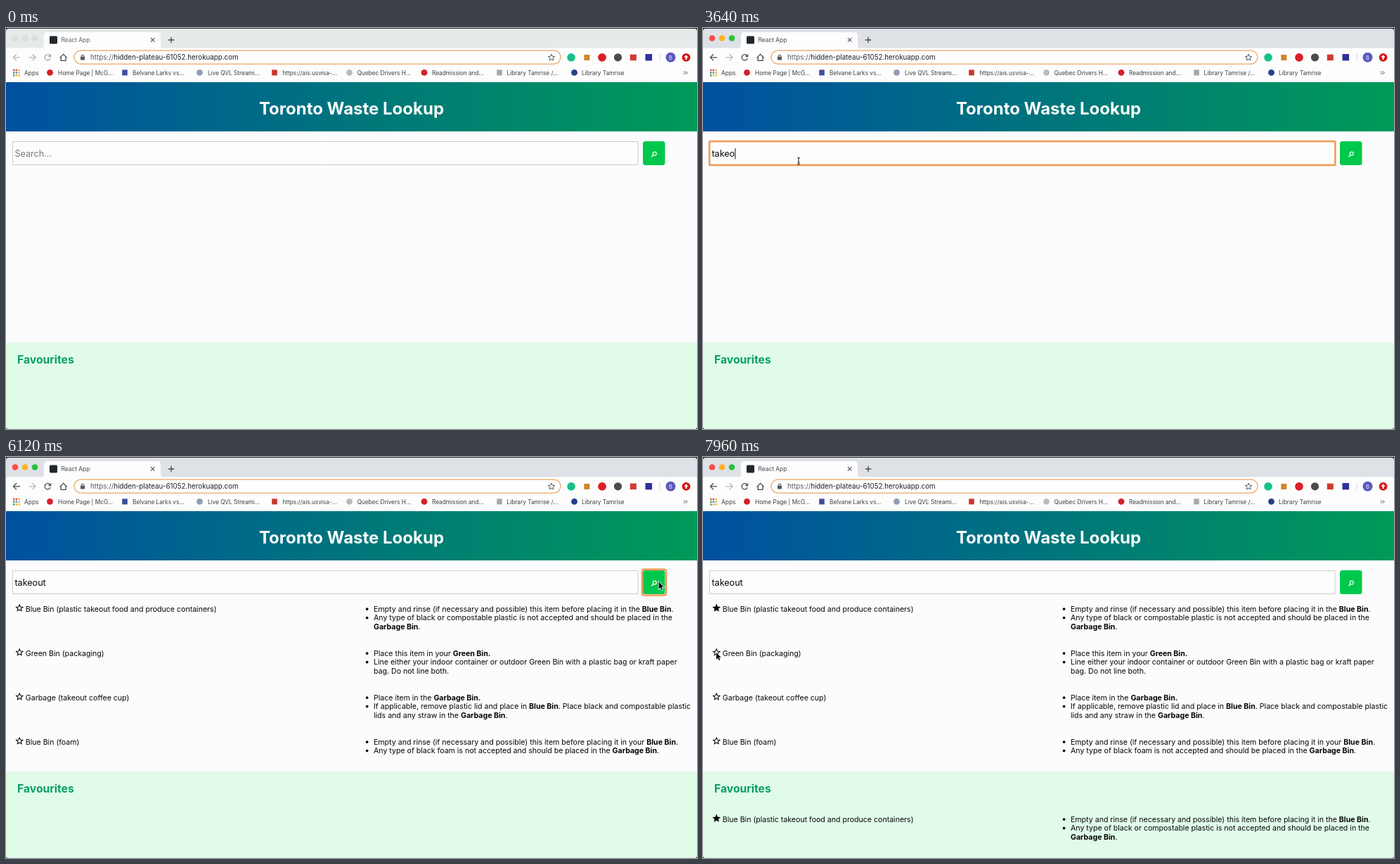
Write an HTML page with a canvas that moves like this. It is 983 by 570 pixels and loops after 8000 ms.

```html
<!DOCTYPE html>
<html lang="en">
<head>
<meta charset="utf-8">
<title>Waste Lookup</title>
<style>
  html, body { margin: 0; width: 100%; height: 100%; overflow: hidden; background: #2b2b2b; }
  canvas { display: block; width: 983px; height: 570px; }
</style>
</head>
<body>
<canvas id="stage"></canvas>
<script>
const W = 983, H = 570, LOOP = 8000;
const canvas = document.getElementById('stage');
const ctx = canvas.getContext('2d');
const dpr = window.devicePixelRatio || 1;
canvas.width = Math.round(W * dpr);
canvas.height = Math.round(H * dpr);

// Timeline in ms
const FOCUS = 1240, SUBMIT = 5600, RESULTS = 6080, FAVOURITE = 7320;
const QUERY = 'takeout';
const KEYS = [2760, 2920, 3080, 3280, 3520, 3800, 4000];
const PATH = [
  [400, 236, 569], [720, 193, 366], [1160, 136, 189], [4440, 136, 189],
  [5280, 928.6, 177.6], [6160, 928.6, 177.6], [6840, 20.8, 212.8], [7480, 20.8, 212.8], [7880, 18.8, 277.8]
];

const BOOKMARKS = [
  [62.5, 'dot', '#d3202a', 74, 'Home Page | McG...'],
  [169, 'box', '#3d4f9a', 180, 'Belvane Larks vs...'],
  [275.5, 'dot', '#8f9db5', 287, 'Live QVL Streami...'],
  [382, 'box', '#c8372d', 393.5, 'https://ais.usvisa-...'],
  [488.5, 'dot', '#b9bcb8', 499.5, 'Quebec Drivers H...'],
  [595, 'dot', '#d3202a', 606, 'Readmission and...'],
  [702, 'box', '#a5a7a8', 712.5, 'Library Tamrise /...'],
  [808.5, 'dot', '#27408b', 819, 'Library Tamrise']
];

// Asterisks switch bold on and off; each inner list is one bullet
const ITEMS = [
  ['Blue Bin (plastic takeout food and produce containers)', [
    ['Empty and rinse (if necessary and possible) this item before placing it in the *Blue Bin*.'],
    ['Any type of black or compostable plastic is not accepted and should be placed in the', '*Garbage Bin*.']]],
  ['Green Bin (packaging)', [
    ['Place this item in your *Green Bin.*'],
    ['Line either your indoor container or outdoor Green Bin with a plastic bag or kraft paper', 'bag. Do not line both.']]],
  ['Garbage (takeout coffee cup)', [
    ['Place item in the *Garbage Bin.*'],
    ['If applicable, remove plastic lid and place in *Blue Bin*. Place black and compostable plastic', 'lids and any straw in the *Garbage Bin*.']]],
  ['Blue Bin (foam)', [
    ['Empty and rinse (if necessary and possible) this item before placing it in your *Blue Bin*.'],
    ['Any type of black foam is not accepted and should be placed in the *Garbage Bin*.']]]
];
const BODY_SIZE = 10.59;

function text(str, x, y, size, color, weight = 400, align = 'left') {
  ctx.font = `${weight} ${size}px Inter, "Noto Sans", sans-serif`;
  ctx.fillStyle = color;
  ctx.textAlign = align;
  ctx.fillText(str, x, y);
  return ctx.measureText(str).width;
}

function richText(str, x, y) {
  str.split('*').forEach((part, i) => {
    x += text(part, x, y, BODY_SIZE, '#060606', i % 2 ? 700 : 400);
  });
}

function rect(x, y, w, h, color) {
  ctx.fillStyle = color;
  ctx.fillRect(x, y, w, h);
}

function round(x, y, w, h, r) {
  ctx.beginPath();
  ctx.roundRect(x, y, w, h, r);
}

function fill(color) { ctx.fillStyle = color; ctx.fill(); }

function stroke(color, width) {
  ctx.strokeStyle = color;
  ctx.lineWidth = width;
  ctx.stroke();
}

function dot(x, y, r, color) {
  ctx.beginPath();
  ctx.arc(x, y, r, 0, Math.PI * 2);
  fill(color);
}

function poly(points, close) {
  ctx.beginPath();
  for (let i = 0; i < points.length; i += 2) ctx.lineTo(points[i], points[i + 1]);
  if (close) ctx.closePath();
}

function line(color, width, ...points) {
  poly(points);
  stroke(color, width);
}

function star(x, y, r, color, width, solid) {
  const pts = [];
  for (let i = 0; i < 10; i++) {
    const a = i * Math.PI / 5 - Math.PI / 2, d = i % 2 ? r * 0.46 : r;
    pts.push(x + d * Math.cos(a), y + d * Math.sin(a));
  }
  poly(pts, true);
  if (solid) fill(color);
  stroke(color, width);
}

function drawTabs(active) {
  rect(0, 0, W, 29, active ? '#dee1e6' : '#e7eaea');
  ['#fc4b47', '#fdb324', '#27c23a'].forEach((color, i) => {
    dot(13 + 14 * i, 14.5, 4.3, active ? color : '#d3d6d6');
    if (!active) dot(13 + 14 * i, 14.5, 3.6, '#dcdfdf');
  });
  ctx.beginPath();
  ctx.moveTo(49, 29);
  ctx.quadraticCurveTo(54, 29, 54, 24);
  ctx.lineTo(54, 11);
  ctx.quadraticCurveTo(54, 6, 59, 6);
  ctx.lineTo(215, 6);
  ctx.quadraticCurveTo(220, 6, 220, 11);
  ctx.lineTo(220, 24);
  ctx.quadraticCurveTo(220, 29, 225, 29);
  fill('#fdfdfe');
  round(62, 11.5, 11, 11, 1.5);
  fill('#20282e');
  text('React App', 78.5, 20, 8.4, active ? '#44474b' : '#5c5f62');
  line('#55585c', 1.2, 206, 14.2, 211.4, 19.6);
  line('#55585c', 1.2, 211.4, 14.2, 206, 19.6);
  line('#45484c', 1.3, 230.8, 17, 239.2, 17);
  line('#45484c', 1.3, 235, 12.8, 235, 21.2);
}

function drawNav(active) {
  const dark = active ? '#4a4d51' : '#a3a5a7', pale = '#b4b6b8';
  line(active ? dark : pale, 1.3, 20, 41.8, 10.6, 41.8);
  line(active ? dark : pale, 1.3, 15, 37.2, 10.4, 41.8, 15, 46.4);
  line(pale, 1.3, 32.6, 41.8, 42, 41.8);
  line(pale, 1.3, 37.6, 37.2, 42.2, 41.8, 37.6, 46.4);
  ctx.beginPath();
  ctx.arc(59.3, 41.8, 4.1, 0.35, Math.PI * 1.75);
  stroke(dark, 1.4);
  poly([64.2, 36.8, 64.2, 41.2, 59.8, 41.2], true);
  fill(dark);
  line('#45484c', 1.3, 76.6, 42.4, 81.6, 37.4, 86.6, 42.4);
  line('#45484c', 1.3, 78.2, 41.2, 78.2, 46.4, 85, 46.4, 85, 41.2);

  round(97, 32, 692, 19.2, 9.6);
  fill('#fefefe');
  stroke('#efb27e', 1.5);
  round(106, 40.6, 6, 5, 0.7);
  fill('#55585c');
  ctx.beginPath();
  ctx.arc(109, 40.2, 1.9, Math.PI, 0);
  stroke('#55585c', 1.1);
  const schemeWidth = text('https://', 120, 45.2, 9.79, '#56595d');
  text('hidden-plateau-61052.herokuapp.com', 120 + schemeWidth, 45.2, 9.79, '#1d1f22');
  star(776, 42, 4.9, '#55585c', 1);
}

function drawExtensions() {
  dot(804, 41.8, 5.8, '#14c287');
  rect(822.3, 38, 8, 8, '#d9822b');
  dot(848, 41.8, 5.9, '#dc1f26');
  dot(870.5, 41.8, 5.6, '#4b4b4b');
  rect(887.8, 37.6, 9, 8.6, '#d03a32');
  rect(909.5, 37, 9.6, 9.4, '#2f319c');
  rect(929.5, 36, 1, 11, '#d6d8da');
  dot(945.5, 41.8, 7, '#5b59bd');
  text('B', 945.5, 44.5, 7.4, '#e9e9fa', 400, 'center');
  dot(967.6, 41.8, 5.9, '#d8140f');
  poly([967.6, 38.2, 970.8, 41.8, 968.7, 41.8, 968.7, 45, 966.5, 45, 966.5, 41.8, 964.4, 41.8], true);
  fill('#fff');
}

function drawBookmarks() {
  const colors = ['#d9493c', '#d9493c', '#e9b52c', '#3a9c56', '#4383e0', '#e9b52c', '#3a9c56', '#e9b52c', '#e9b52c'];
  colors.forEach((c, i) => rect(10 + i % 3 * 3.7, 58.8 + Math.floor(i / 3) * 3.7, 2.4, 2.4, c));
  text('Apps', 26, 66.6, 8.4, '#3b3e42');
  for (const [x, shape, color, tx, label] of BOOKMARKS) {
    if (shape === 'dot') dot(x, 63.4, 4.4, color);
    else rect(x - 3.8, 59.4, 7.6, 8, color);
    text(label, tx, 66.6, 8.27, '#3b3e42');
  }
  for (const x of [964, 967]) line('#45484c', 1, x, 61.4, x + 2.2, 63.6, x, 65.8);
}

function drawHeader() {
  const g = ctx.createLinearGradient(0, 0, W, 0);
  g.addColorStop(0, '#0050a0');
  g.addColorStop(1, '#009a58');
  rect(0, 77, W, 70, g);
  text('Toronto Waste Lookup', 491.5, 122.8, 24, '#fbfdfd', 700, 'center');
}

function focusRing(x, y, w, h, r) {
  round(x, y, w, h, r);
  stroke('rgba(244,170,110,.45)', 3.6);
  stroke('#ee9450', 1.9);
}

function drawSearch(t) {
  const typed = QUERY.slice(0, KEYS.filter(k => k <= t).length);
  const focused = t >= FOCUS && t < SUBMIT;
  round(9.5, 161.5, 889.5, 33, 0);
  fill('#fdfdfe');
  stroke('#cbcdc2', 1);
  if (focused) focusRing(9.2, 161.1, 890.2, 33.8, 1);
  const color = typed ? '#060606' : '#777772';
  const width = text(typed || 'Search...', 12.4, 183.3, 12.6, color);
  const lastKey = Math.max(FOCUS, ...KEYS.filter(k => k <= t));
  if (focused && (t - lastKey) % 1000 < 500) {
    rect(12.6 + (typed ? width : 0), 171, 1, 15.4, '#111');
  }

  round(906, 161, 31.5, 34, 3.5);
  fill('#00c84c');
  if (t >= SUBMIT && t < FAVOURITE) focusRing(905, 159.8, 34, 36.8, 3);
  ctx.beginPath();
  ctx.arc(922.8, 178.6, 2.5, 0, Math.PI * 2);
  stroke('#f3fff6', 1.2);
  line('#f3fff6', 1.4, 921, 180.6, 918.4, 183.2);
}

function drawItem([name, bullets], y, starred) {
  star(19.2, y - 5, 4.9, '#060606', 1.05, starred);
  text(name, 27.8, y, BODY_SIZE, '#060606');
  for (const lines of bullets) {
    dot(513.6, y - 3.7, 1.9, '#060606');
    for (const str of lines) {
      richText(str, 523, y);
      y += 12.45;
    }
  }
}

function drawPage(t) {
  const starred = t >= FAVOURITE;
  rect(0, 77, W, H - 77, '#fcfcfe');
  drawHeader();
  drawSearch(t);
  if (t >= RESULTS) ITEMS.forEach((item, i) => drawItem(item, 219.8 + 63 * i, starred && i === 0));
  rect(0, 447, W, H - 447, '#e1fbe9');
  text('Favourites', 16, 476.7, 15.7, '#06a064', 700);
  if (starred) drawItem(ITEMS[0], 518.8, true);
}

function pointerAt(t) {
  if (t < PATH[0][0]) return null;
  for (let i = 1; i < PATH.length; i++) {
    const [t0, x0, y0] = PATH[i - 1], [t1, x1, y1] = PATH[i];
    if (t < t1) {
      const p = (t - t0) / (t1 - t0), e = p * p * (3 - 2 * p);
      return [x0 + (x1 - x0) * e, y0 + (y1 - y0) * e];
    }
  }
  return PATH[PATH.length - 1].slice(1);
}

function drawPointer(t) {
  const pos = pointerAt(t);
  if (!pos) return;
  const [x, y] = pos;
  ctx.save();
  ctx.translate(x, y);
  if (x > 9 && x < 899 && y > 161 && y < 195) {
    line('#222', 1.1, 0, -4, 0, 4.2);
    line('#222', 1, -2, -5, 0, -4, 2, -5);
    line('#222', 1, -2, 5.2, 0, 4.2, 2, 5.2);
    line('#222', 1, -1.3, 1.8, 1.3, 1.8);
  } else {
    poly([0, 0, 0, 10, 2.3, 7.9, 3.9, 11.5, 5.5, 10.8, 4, 7.3, 7, 7.2], true);
    stroke('#fff', 1.5);
    fill('#0a0a0a');
  }
  ctx.restore();
}

function draw(t) {
  const active = t >= FOCUS;
  ctx.setTransform(dpr, 0, 0, dpr, 0, 0);
  rect(0, 0, W, H, '#2b2b2b');
  ctx.save();
  round(0, 1, W, H - 1.3, 3.5);
  ctx.clip();
  drawTabs(active);
  rect(0, 28.5, W, 48.5, '#fdfdfe');
  drawNav(active);
  drawExtensions();
  drawBookmarks();
  drawPage(t);
  drawPointer(t);
  ctx.restore();
}

const start = performance.now();
function tick() {
  draw((performance.now() - start) % LOOP);
  requestAnimationFrame(tick);
}
tick();
</script>
</body>
</html>
```
